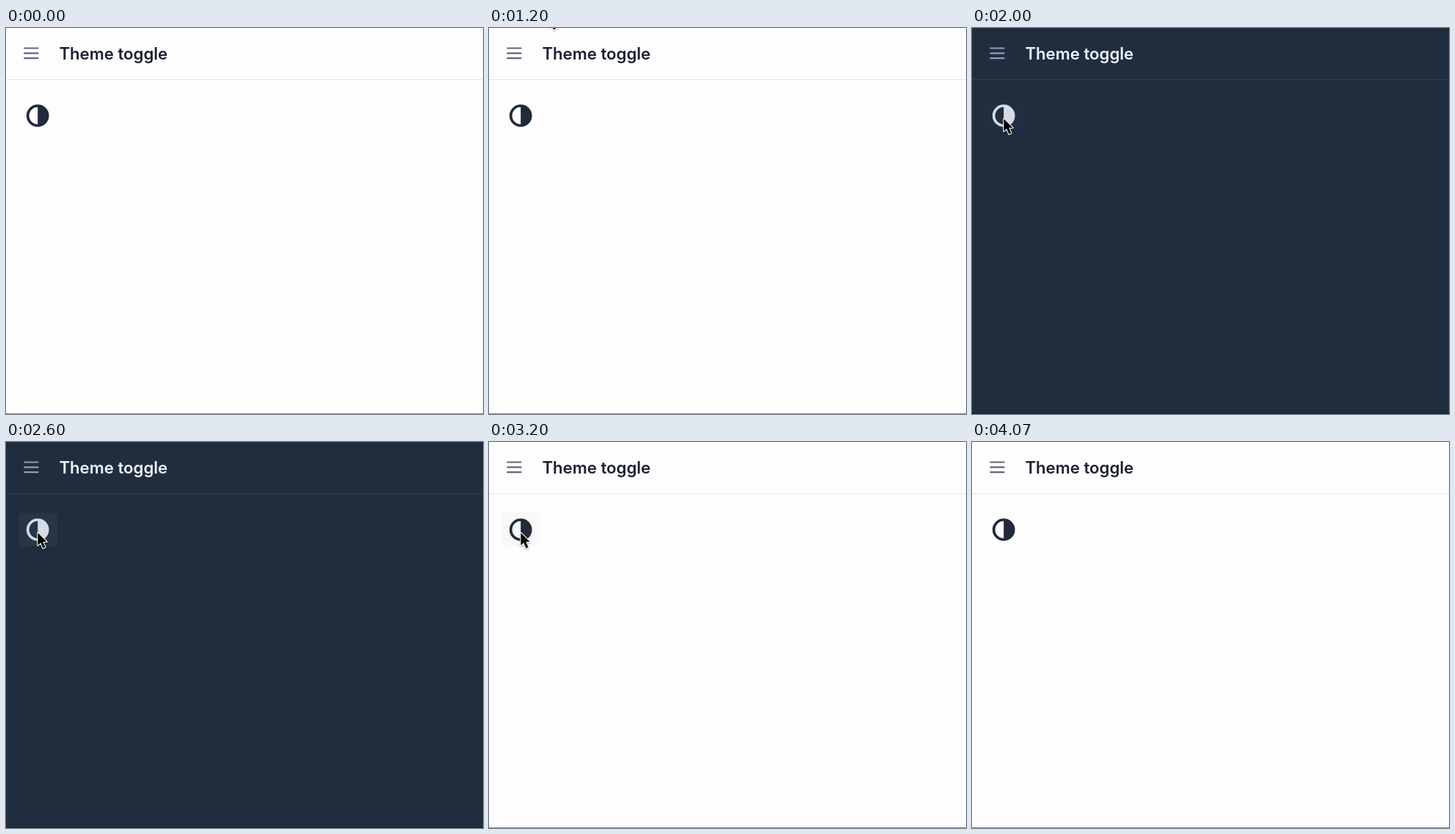
Recreate the animation shown at these times as an HTML page. Size 650 by 526 pixels, loop 5190 ms.

```html
<!DOCTYPE html>
<html lang="en">
<head>
<meta charset="utf-8">
<title>Theme toggle</title>
<style>
  html, body { margin: 0; width: 100%; height: 100%; overflow: hidden; }
  svg {
    --bg: #fdfdfd; --ink: #212a3b; --title: #1a2030; --menu: #5f6878;
    --rule: #e2e3e4; --edge: #8b8b8b; --hover: #f8f8f8;
    display: block; width: 650px; height: 526px; background: var(--bg);
  }
  svg.dark {
    --bg: #202d3f; --ink: #d4dbe7; --title: #f0f4fa; --menu: #919eb2;
    --rule: #344152; --edge: #141b27; --hover: #283545;
  }
  text { font: 600 22.2px Inter, "Liberation Sans", sans-serif; fill: var(--title); }
  #menu { stroke: var(--menu); stroke-width: 2.2; stroke-linecap: round; }
  #hover { fill: var(--hover); }
  #arrow { filter: drop-shadow(0 1px 1px #0005); }
</style>
</head>
<body>
<svg id="stage" viewBox="0 0 650 526">
  <path id="menu" d="M25.2 27.5h18.3M25.2 34.4h18.3M25.2 41.2h18.3"/>
  <text x="72.4" y="43">Theme toggle</text>
  <rect y="70" width="650" height="1" fill="var(--rule)"/>
  <rect y="525" width="650" height="1" fill="var(--edge)"/>
  <rect id="hover" x="17" y="96.5" width="53" height="46" rx="6"/>
  <circle cx="43.2" cy="119.5" r="13.5" fill="none" stroke="var(--ink)" stroke-width="3.7"/>
  <path d="M43.2 106a13.5 13.5 0 0 1 0 27z" fill="var(--ink)"/>
  <path id="arrow" d="M0 0V17L3.9 13.4 7 21 10.1 19.7 7 12.2H12.2Z"
    stroke="#fff" stroke-width="2.2" stroke-linejoin="round" paint-order="stroke"/>
</svg>
<script>
  const LOOP = 5190, TICK = 1000 / 15;
  const ENTER = 1200, ARRIVE = 1530, DARK = 2000, LIGHT = 3200, LEAVE = 4000;
  const from = [81, -19], to = [43.4, 123.8];
  const [stage, hover, arrow] = ["stage", "hover", "arrow"].map(id => document.getElementById(id));
  const clamp = v => Math.min(1, Math.max(0, v));
  const show = (el, on) => el.setAttribute("visibility", on ? "visible" : "hidden");

  function draw(t) {
    const step = Math.floor((t + 0.01) / TICK) * TICK;
    const p = clamp((step - ENTER) / (ARRIVE - ENTER));
    const ease = 1 - (1 - p) ** 2;
    const [x, y] = from.map((a, i) => a + (to[i] - a) * ease);
    const present = t >= ENTER && t < LEAVE;
    const dark = t >= DARK && t < LIGHT;

    stage.classList.toggle("dark", dark);
    arrow.setAttribute("transform", `translate(${x} ${y})`);
    show(arrow, present);
    show(hover, present && x < 70 && y > 96);
    hover.setAttribute("opacity", dark ? 0.15 + 0.85 * clamp((t - DARK) / 150) : 1);
  }

  const start = performance.now();
  function frame() {
    draw((performance.now() - start) % LOOP);
    requestAnimationFrame(frame);
  }
  frame();
</script>
</body>
</html>
```
